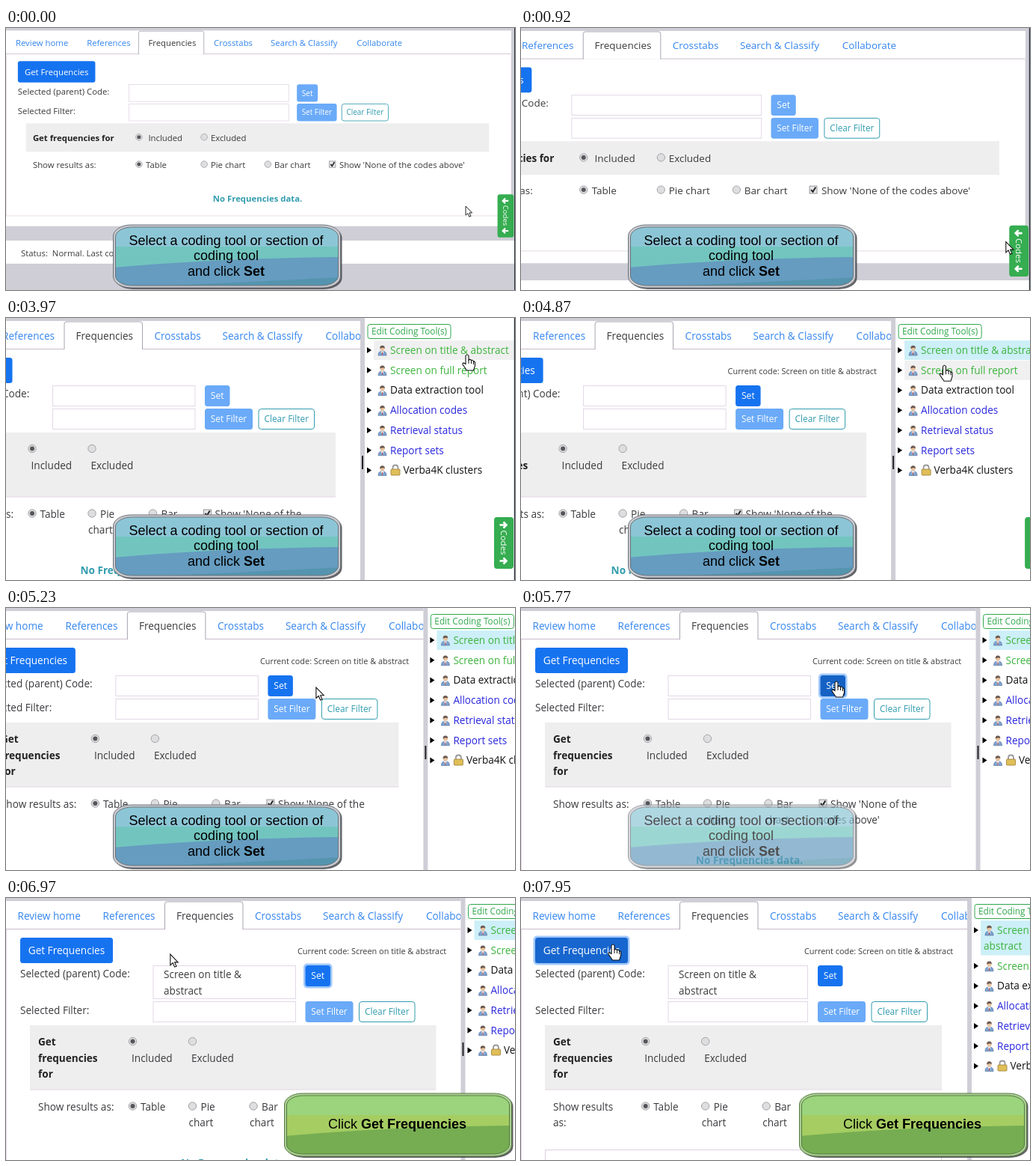
Animation of 681x350 px, one loop 8000 ms. Source, as an HTML page:

```html
<!DOCTYPE html>
<html lang="en">
<head>
<meta charset="utf-8">
<title>Frequencies walkthrough</title>
<style>
html, body { margin: 0; width: 100%; height: 100%; overflow: hidden; background: #fff; }
svg { display: block; width: 681px; height: 350px; }
text { font-family: "Open Sans", "Noto Sans", sans-serif; white-space: pre; }
.callout text { font-family: "Liberation Sans", Arial, sans-serif; }
</style>
</head>
<body>
<svg id="stage" viewBox="0 0 681 350"></svg>
<script>
const LOOP = 8000, STEP = 60, ZOOM = 1.1975;
const GREY = '#cfced6', LINE = '#cbbccb', SOFT = '#e6d8e4', INK = '#3b3b3f', LINK = '#3586ee',
      BLUE = '#1673f0', PALE = '#6aaaf8', TEAL = '#319cae', GREEN = '#2fa84b';

// Moments at which the page changes at once
const OPEN = 1870, PICK = 4430, SET = 5830, HOVER_GET = 7270, CLICK_GET = 7650, RESULT = 7710;

// time, zoom, pan
const CAMERA = [[0, 1, 0], [200, 1, 0], [960, ZOOM, -134.5], [4750, ZOOM, -134.5], [5515, ZOOM, 0]];
// time, x, y in page units
const POINTER = [[0, 736.5, 285], [200, 736.5, 285], [920, 783, 288], [1290, 795.5, 291],
  [2580, 795.5, 291], [3360, 756, 72], [3420, 756, 72], [3970, 751.5, 49], [4750, 751.5, 49],
  [5230, 465, 106], [5530, 422, 98], [6430, 422, 98], [7210, 130, 65], [7390, 123, 62]];

const ROWS = [['Screen on title & abstract', '#3cb43c'], ['Screen on full report', '#3cb43c'],
  ['Data extraction tool', '#111'], ['Allocation codes', '#2a26dc'], ['Retrieval status', '#2a26dc'],
  ['Report sets', '#2a26dc'], ['Verba4K clusters', '#111']];

function track(keys, t) {
  const i = keys.findLastIndex(k => k[0] <= t);
  const [start, ...from] = keys[i], next = keys[i + 1];
  if (!next) return from;
  const u = Math.floor((t - start) / STEP) * STEP / (next[0] - start);
  return from.map((v, j) => v + (next[j + 1] - v) * u);
}
const ramp = (t, a, b) => Math.min(1, Math.max(0, (t - a) / (b - a)));
const within = ([x, y], l, t, r, b) => x >= l && x <= r && y >= t && y <= b;

const rect = (x, y, w, h, fill, more = '') =>
  `<rect x="${x}" y="${y}" width="${w}" height="${h}" fill="${fill}" ${more}/>`;
const path = (d, more) => `<path d="${d}" ${more}/>`;
// y is the middle of the line of text
const text = (x, y, s, fill = INK, size = 13.6, more = '') =>
  `<text x="${x}" y="${y + size * .36}" font-size="${size}" fill="${fill}" ${more}>${s}</text>`;
const MID = 'text-anchor="middle" ', BOLD = 'font-weight="700"';

function button(x, y, w, h, label, fill, size, { color = '#fff', ring, edge } = {}) {
  return (ring ? rect(x - 2.5, y - 2.5, w + 5, h + 5, '#a0c8fa', 'rx="5"') : '') +
    rect(x, y, w, h, fill, `rx="3.5" ${edge ? `stroke="${edge}"` : ''}`) +
    text(x + w / 2, y + h / 2, label, color, size, MID);
}
const input = (x, y, w, h) => rect(x + .5, y + .5, w, h, '#fff', 'stroke="#e2d8e6"');
const radio = (x, y, on) =>
  `<circle cx="${x}" cy="${y}" r="5.2" fill="#dedee0" stroke="#a4a4a8"/>` +
  (on ? `<circle cx="${x}" cy="${y}" r="3" fill="#55555a"/>` : '');
const checkbox = (x, y) => rect(x - 5, y - 5, 10, 10, '#e6e6e8', 'stroke="#98989c"') +
  path(`M${x - 3} ${y}l2.4 2.8L${x + 3.2} ${y - 3.5}`, 'fill="none" stroke="#222" stroke-width="2"');

function tabs() {
  const names = ['Review home', 'References', 'Frequencies', 'Crosstabs', 'Search & Classify', 'Collaborate'];
  const xs = [15.5, 129.5, 228, 333, 424, 562];
  return rect(0, 0, 816, 4, GREY) + path('M0 41.5H809', `stroke="${LINE}"`) +
    path('M212.5 42V8q0-3 3-3h98.500q3 0 3 3V42', 'fill="#fff" stroke="#a9a3b0"') +
    names.map((n, i) => text(xs[i], 23.7, n, i == 2 ? INK : LINK)).join('');
}

function mainPage(t, p) {
  const open = t >= OPEN, picked = t >= PICK, set = t >= SET, done = t >= RESULT;
  const dy = set ? 17 : 0, bx = done ? 397 : open ? 400.5 : 466;
  const right = done ? 383 : open ? 387 : 452.5;
  const onSet = picked && within(p, 400, 90, 434, 119);
  let s = tabs() + path(`M.5 42V${open ? 350 : 300}`, `stroke="${SOFT}"`);

  s += button(19, 53, 124, 34, 'Get Frequencies', t >= HOVER_GET ? '#1766cf' : BLUE, 13.6, { ring: t >= CLICK_GET });
  if (picked) s += text(done ? 379 : 390, 71, 'Current code: Screen on title & abstract', INK, 10.9);
  s += text(19, 101.5, 'Selected (parent) Code:') + text(19, 133 + dy, 'Selected Filter:');
  s += input(196.5, 90, right - 196.5, 27 + dy) + input(196.5, 121 + dy, right - 196.5, 27);
  if (set) s += text(211, 102, 'Screen on title &') + text(211, 124, 'abstract');
  s += button(bx, 90, 33.5, 28, 'Set', !picked ? PALE : onSet && t >= 5590 ? '#1562c4' : BLUE, 12.2,
    { ring: t >= 5590 && t < CLICK_GET });
  s += button(bx, 121 + dy, 64, 28, 'Set Filter', PALE, 11.9);
  s += button(bx + 72, 121.5 + dy, 74.5, 27, 'Clear Filter', '#fff', 11.9, { color: TEAL, edge: TEAL });

  return s + (open ? narrowForm(dy, done) : wideForm());
}

function wideForm() {
  const y1 = 175.5, y2 = 219;
  return rect(32, 152.5, 742, 45.5, '#eee') +
    text(43, y1, 'Get frequencies for', '#222', 13.6, BOLD) +
    radio(213, y1 - 1, true) + text(228, y1, 'Included') +
    radio(317.5, y1 - 1) + text(328, y1, 'Excluded') +
    text(43, y2, 'Show results as:') +
    radio(213, y2 - 1, true) + text(224, y2, 'Table') +
    radio(317.5, y2 - 1) + text(328, y2, 'Pie chart') +
    radio(419.5, y2 - 1) + text(430, y2, 'Bar chart') +
    checkbox(523, y2 - 1) + text(534, y2, "Show 'None of the codes above'") +
    text(403, 273, 'No Frequencies data.', TEAL, 13.6, MID + BOLD) +
    path('M0 300.5H809.5V42', `fill="none" stroke="${SOFT}"`) +
    rect(0, 317, 816, 23, GREY) + rect(0, 377, 816, 60, GREY) +
    text(24, 360, 'Status:  Normal. Last command: done') +
    rect(809.5, 0, 6, 317, GREY);
}

function narrowForm(dy, done) {
  const d = done ? -2.8 : 0, y = 174.5 + dy, y2 = 262 + dy, width = (done ? 563 : 575.5) - 32;
  const [a, b, c, e] = [169.5, 249.5, 331, 404].map(x => x + d);
  return rect(32, 153 + dy, width, 86, '#eee') + rect(32, 238.5 + dy, width, 1, SOFT) +
    ['Get', 'frequencies', 'for'].map((w, i) => text(43, y + .5 + 21.7 * i, w, '#222', 13.6, BOLD)).join('') +
    radio(a, y, true) + text(a - 1.5, y + 22.8, 'Included') +
    radio(b, y) + text(b - 1.5, y + 22.8, 'Excluded') +
    (done ? text(43, y2, 'Show results') + text(43, y2 + 21.5, 'as:') : text(43, y2, 'Show results as:')) +
    radio(a, y2 - 1, true) + text(a + 10.5, y2, 'Table') +
    radio(b, y2 - 1) + text(b + 11, y2, 'Pie') + text(b - 5, y2 + 21.5, 'chart') +
    radio(c, y2 - 1) + text(c + 11, y2, 'Bar') + text(c - 5, y2 + 21.5, 'chart') +
    checkbox(e, y2 - 1) + text(e + 10, y2, "Show 'None of the") + text(e - 6, y2 + 21.5, "codes above'") +
    (done ? rect(32.5, 336.5, 530, 40, '#fff', 'stroke="#ddcfe2"')
          : text(234, 337 + dy, 'No Frequencies data.', TEAL, 13.6, BOLD));
}

const person = (x, y) => `<g transform="translate(${x} ${y})">` +
  path('M-5.500 7Q-5.500 2-2 1.500H2Q5.500 2 5.500 7Z', 'fill="#7fa3cf" stroke="#4a6a98" stroke-width=".6"') +
  path('M-2 1.500L0 6 2 1.500Z', 'fill="#fff"') + path('M0 2.500V6', 'stroke="#b5443a" stroke-width="1.1"') +
  '<circle cy="-2.300" r="3.100" fill="#e8c3a0"/>' +
  path('M-3.300-2.300Q-3.500-6.300 0-6.300T3.300-2.300Q2-4.300-3.300-2.300Z', 'fill="#6b5a50"') + '</g>';
const lock = (x, y) => path(`M${x - 3.5} ${y - 1}v-2.500q0-3.500 3.500-3.500t3.500 3.500v2.500`, 'fill="none" stroke="#999" stroke-width="1.8"') +
  rect(x - 6, y - 1.5, 12, 8, '#e0bf58', 'rx="1" stroke="#9a7a34" stroke-width=".8"');

function panel(t, p) {
  const done = t >= RESULT, dx = done ? -11.5 : 0;
  let s = `<g transform="translate(${dx})">` + rect(608.5, 0, 220, 352, '#fff') + rect(608.5, 0, 6, 352, GREY);
  if (!done) s += rect(610.5, t >= SET ? 193 : 184, 2, 18, '#222');
  s += rect(618.5, 8.5, 111, 19, '#fff', `rx="3" stroke="${GREEN}"`) + text(674, 18, 'Edit Coding Tool(s)', GREEN, 11.8, MID);
  ROWS.forEach(([name, color], i) => {
    const top = 30 + 26.75 * i + (done && i ? 21 : 0), y = top + 13;
    const picked = !i && t >= PICK, wrap = !i && done;
    if (picked || within(p, 627, top, 814, top + 26.7))
      s += rect(626.5, top, 200, wrap ? 46.5 : 26, picked ? '#cdeff8' : '#f0f0f0');
    s += path(`M617.500 ${y - 4}l6 4-6 4Z`, 'fill="#000"') + person(638, y);
    const locked = i == 6;
    if (locked) s += lock(655.5, y);
    s += wrap ? text(648.5, y, 'Screen on title &', color) + text(630.5, y + 21, 'abstract', color)
              : text(locked ? 666 : 648.5, y, name, color);
  });
  return s + '</g>';
}

function codesButton(t, hover) {
  const dir = t >= OPEN ? 1 : -1;
  const arrow = y => path(`M${800 - 5 * dir} ${y}h${9 * dir}m${-4 * dir}-4l${4 * dir} 4l${-4 * dir} 4`,
    'fill="none" stroke="#fff" stroke-width="2.6"');
  return rect(787.5, 266, 26, 69, hover ? '#24803a' : '#35ad50', 'rx="4"') + arrow(276.5) + arrow(324.5) +
    `<g transform="translate(800.500 300) rotate(90)">${text(0, 0, 'Codes', '#fff', 11.5, MID)}</g>`;
}

function pointer([x, y], hand) {
  const d = hand
    ? 'M-2 1.500Q0-1.500 2 1.500V7Q4 5.500 5.500 7.500Q7.500 6.500 8.500 9Q10.500 8.500 10.500 11V15L8.500 21H-.500L-6 13Q-6.500 9.500-2 12.500Z'
    : 'M0 0V14.500L3.300 11.500L5.800 17L8.200 16L5.800 10.700H10.300Z';
  return path(d, `transform="translate(${x} ${y})" fill="#fff" stroke="#111" stroke-width="1.1"`) +
    (hand ? path('M2 7v5m3.500-4.500v4.500m3-3v4', `transform="translate(${x} ${y})" stroke="#111" fill="none"`) : '');
}

function callout(id, x, y, c, lines, alpha) {
  if (!alpha) return '';
  const w = 304, h = 84, inner = `x="${x + 3}" y="${y + 3}" width="${w - 6}" height="${h - 6}" rx="22" ry="13"`;
  const outer = 'rx="24" ry="15"';
  return `<g class="callout" opacity="${alpha}"><clipPath id="${id}"><rect ${inner}/></clipPath>` +
    rect(x + 2, y + 2, w, h, '#3c3c40', outer + ' opacity=".8"') +
    rect(x, y, w, h, c.rim, `${outer} stroke="${c.edge}"`) +
    `<g clip-path="url(#${id})">` + rect(x, y, w, h, c.top) + rect(x, y + 29, w, h, c.mid) +
    path(`M${x} ${y + 57}Q${x + 130} ${y + 45} ${x + w} ${y + 43}V${y + h}H${x}Z`, `fill="${c.low}"`) +
    path(`M${x} ${y + h}Q${x + 190} ${y + 76} ${x + w} ${y + 70}V${y + h}Z`, `fill="${c.foot}"`) + '</g>' +
    `<rect ${inner} fill="none" stroke="${c.edge}"/>` +
    lines.map(([ty, s]) => text(x + w / 2 - 1, ty, s, '#000', 18, MID)).join('') + '</g>';
}
const SEA = { rim: '#c9c9ce', edge: '#6b747c', top: '#8cc6d6', mid: '#72c5bf', low: '#659cc0', foot: '#5594ae' };
const LEAF = { rim: '#a9cf92', edge: '#587a44', top: '#9bd47c', mid: '#a5cd62', low: '#76ad52', foot: '#76ad52' };

function render(t) {
  const [zoom, pan] = track(CAMERA, t), p = track(POINTER, t);
  const view = `<g transform="translate(${pan}) scale(${zoom / ZOOM})">`;
  const overCodes = within(p, 787.5, 266, 813.5, 335);
  const hand = overCodes || t >= HOVER_GET || (t >= PICK && within(p, 400, 90, 434, 119)) ||
    (t >= OPEN && within(p, 627, 30, 814, 217));
  return rect(0, 0, 681, 350, '#fff') + view + mainPage(t, p) +
    (t >= OPEN ? panel(t, p) : '') + rect(814.3, 0, 1.5, 420, '#27323c') +
    codesButton(t, overCodes) + '</g>' +
    callout('sea', 143.5, 263, SEA, [[284, 'Select a coding tool or section of'], [304, 'coding tool'],
      [325, 'and click <tspan font-weight="700">Set</tspan>']], 1 - ramp(t, 5590, 6190)) +
    callout('leaf', 372.5, 261, LEAF, [[302, 'Click <tspan font-weight="700">Get Frequencies</tspan>']], ramp(t, 6250, 6850)) +
    view + pointer(p, hand) + '</g>';
}

const stage = document.getElementById('stage');
const begin = performance.now();
function frame() {
  stage.innerHTML = render((performance.now() - begin) % LOOP);
  requestAnimationFrame(frame);
}
frame();
</script>
</body>
</html>
```
